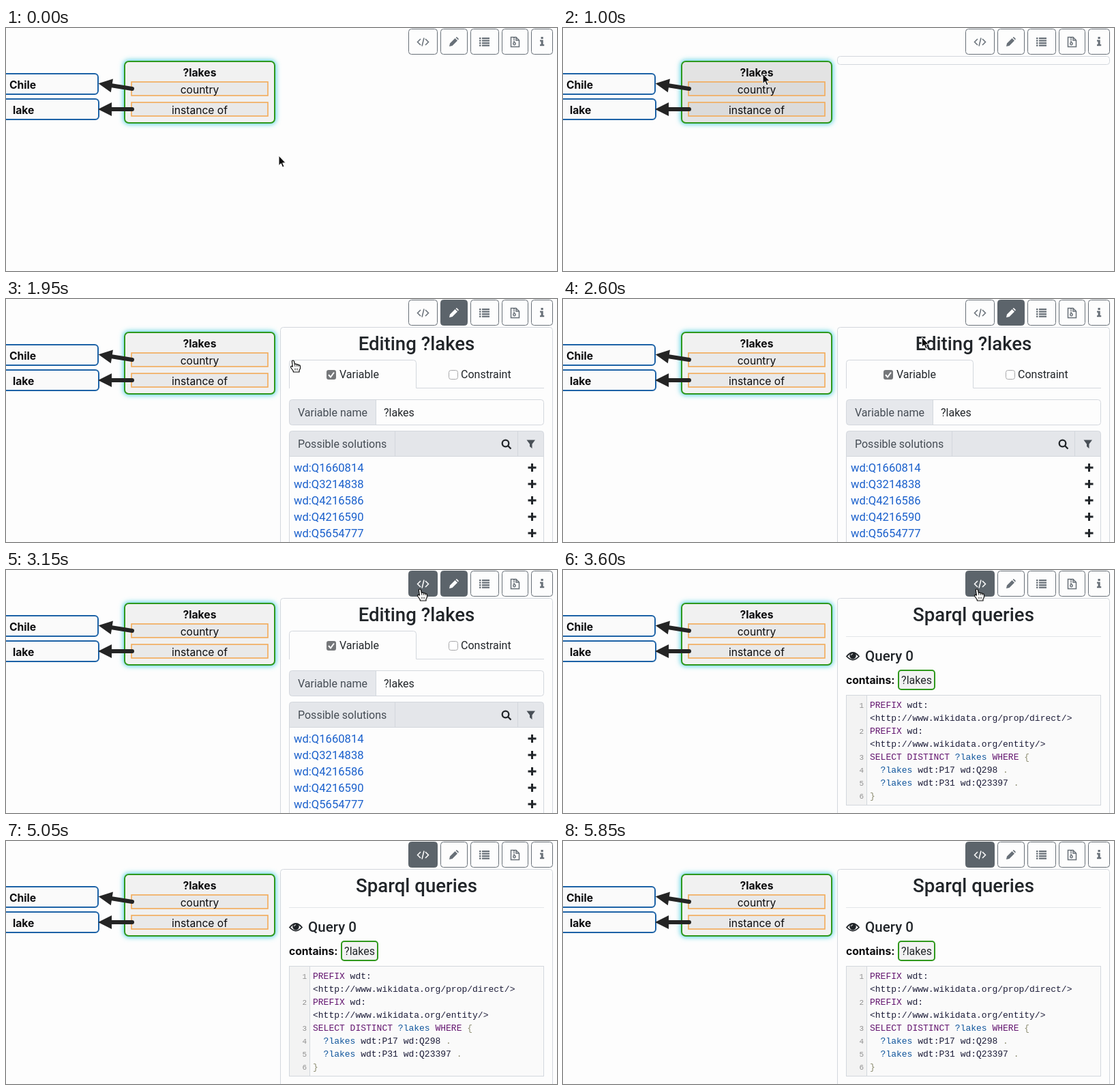
An HTML page that plays this animation: 808 by 356 pixels, repeating every 5.9 s.

```html
<!DOCTYPE html>
<html lang="en">
<head>
<meta charset="utf-8">
<title>Query builder</title>
<style>
html, body { margin: 0; width: 100%; height: 100%; overflow: hidden; background: #fdfdfd; }
body > svg { display: block; }
text { font: 16px Roboto, sans-serif; fill: #212529; white-space: pre; }
.node { font: 15.6px Inter, sans-serif; fill: #0c0c0e; }
.bold { font: bold 15.7px Inter, sans-serif; fill: #0c0c0e; }
.mid { text-anchor: middle; }
.title { font: 500 27.6px Roboto, sans-serif; }
.sub { font: 500 20.6px Roboto, sans-serif; }
.label { fill: #454c54; }
.link { font-size: 16.6px; fill: #1a60cc; }
.code text { font: 13px "Liberation Mono", monospace; fill: #1c1c38; }
.code .num { font-size: 11px; fill: #909090; text-anchor: end; }
.code .kw { fill: #63156f; } .code .var { fill: #0f559c; } .code .brace { fill: #8c8c70; }
.rule { fill: none; stroke: #d3d7dd; }
.line { fill: none; stroke: currentColor; }
.solid { fill: currentColor; }
.dark { fill: #212529; }
</style>
</head>
<body>
<svg width="808" height="356" viewBox="0 0 808 356">
  <defs>
    <filter id="glow" x="-10%" y="-20%" width="120%" height="140%"><feGaussianBlur stdDeviation="3.5"/></filter>
  </defs>

  <!-- graph -->
  <g stroke-width="2" fill="#fafafa" stroke="#1c62a6">
    <rect x="-20" y="67" width="155" height="30" rx="5"/>
    <rect x="-20" y="104" width="156" height="30" rx="5"/>
  </g>
  <text class="bold" x="5" y="89">Chile</text>
  <text class="bold" x="10" y="126">lake</text>
  <rect x="172" y="47" width="224" height="94" rx="8" fill="#4fd0e0" filter="url(#glow)"/>
  <rect id="box" x="174" y="49" width="220" height="90" rx="6" stroke="#2f981c" stroke-width="2"/>
  <g fill="#000" fill-opacity=".035" stroke="#f3ab58" stroke-width="1.6">
    <rect x="184" y="79" width="200" height="20"/>
    <rect x="184" y="109" width="200" height="20"/>
  </g>
  <text class="bold mid" x="284" y="71">?lakes</text>
  <text class="node mid" x="284" y="96">country</text>
  <text class="node mid" x="284" y="126">instance of</text>
  <g id="arrow" fill="#242424" stroke="#242424">
    <path d="M185 119H153" stroke-width="6" stroke-linecap="round"/>
    <path d="M135 119L155 109V129Z" stroke="none"/>
  </g>
  <use href="#arrow" transform="translate(185 89) rotate(9) translate(-185 -119)"/>

  <!-- toolbar -->
  <g id="bar" stroke-width="1.5">
    <g><rect x="590.5" y="1.5" width="42" height="37" rx="4"/>
      <path class="line" d="M608 16L603.5 20.5L608 25M615 16L619.5 20.5L615 25M613 14.5L610 26.5"/></g>
    <g><rect x="637.5" y="1.5" width="39" height="37" rx="4"/>
      <path class="solid" d="M650 27L651 22.5L658.5 15L662 18.5L654.5 26ZM659.5 14L661 13L664 16L663 17.5Z"/></g>
    <g><rect x="681.5" y="1.5" width="41" height="37" rx="4"/>
      <path class="line" stroke-width="2.2" d="M694 15.2h2.5m1.5 0h11M694 18.7h2.5m1.5 0h11M694 22.2h2.5m1.5 0h11M694 25.7h2.5m1.5 0h11"/></g>
    <g><rect x="727.5" y="1.5" width="38" height="37" rx="4"/>
      <path class="line" d="M740.5 13.5H748L752.5 18V27.5H740.5ZM748 13.5V18H752.5"/>
      <path class="line" stroke-width="2" stroke-dasharray="1.5 1" d="M745 14V21"/>
      <circle class="line" cx="745.5" cy="23" r="1.7"/></g>
    <g><rect x="770.5" y="1.5" width="31" height="37" rx="4"/>
      <path class="solid" d="M784.5 13h3.2v3h-3.2ZM783 17.5h4.7v6.5h1.5v2.2h-6.2v-2.2h1.5v-4.3h-1.5Z"/></g>
  </g>

  <!-- editing panel -->
  <svg id="edit" x="402" width="400">
    <rect class="frame rule" x=".5" y=".5" width="399" rx="4"/>
    <g transform="translate(-402 -41)">
      <text class="title mid" x="602" y="75">Editing ?lakes</text>
      <path class="rule" d="M415.5 131V93.5a4 4 0 0 1 4-4H597.5a4 4 0 0 1 4 4V130.5H789"/>
      <rect x="470" y="104" width="14" height="14" rx="3" fill="#75777a"/>
      <path d="M473 111L476 114.5L481 107.5" fill="none" stroke="#fff" stroke-width="2"/>
      <text x="489" y="116">Variable</text>
      <rect x="649.5" y="104.5" width="13" height="13" rx="3" fill="#fff" stroke="#a8a8aa"/>
      <text x="667" y="116">Constraint</text>

      <path d="M543 147.5H419.5a4 4 0 0 0-4 4V180.5a4 4 0 0 0 4 4H543Z" fill="#e6e8ec"/>
      <rect class="rule" x="415.5" y="147.5" width="373" height="37" rx="4"/>
      <path class="rule" d="M542.5 148V184"/>
      <text class="label" x="428" y="172">Variable name</text>
      <text x="554" y="172">?lakes</text>

      <path d="M415.5 230.5V197.5a4 4 0 0 1 4-4H784.5a4 4 0 0 1 4 4V230.5Z" fill="#e4e6ea"/>
      <path class="rule" d="M415.5 500V197.5a4 4 0 0 1 4-4H784.5a4 4 0 0 1 4 4V500M415.5 230.5H788.5M570.5 194V230M750.5 194V230"/>
      <text class="label" x="428" y="218">Possible solutions</text>
      <g fill="none" stroke="#212529" stroke-width="2.3">
        <circle cx="732.5" cy="211.5" r="4.8"/><path d="M736 215L740.5 219.5"/>
      </g>
      <path fill="#495057" d="M763.5 206.5H776L771.5 212.5V219L768 216V212.5Z"/>
      <g id="rows"></g>
    </g>
  </svg>

  <!-- query panel -->
  <svg id="query" x="402" y="41" width="400">
    <rect class="frame rule" x=".5" y=".5" width="399" rx="4"/>
    <g transform="translate(-402 -41)">
      <text class="title mid" x="602" y="75">Sparql queries</text>
      <path class="rule" stroke-opacity=".6" d="M415 97.5H789"/>
      <path d="M416 126.5Q425 115.5 434 126.5Q425 136.5 416 126.5Z" fill="none" stroke="#212529" stroke-width="1.8"/>
      <circle class="dark" cx="425" cy="125.5" r="4.8"/>
      <path d="M422.5 125Q422.5 122.8 425 122.8" fill="none" stroke="#fff"/>
      <text class="sub" x="443" y="133">Query 0</text>
      <text class="bold" x="415" y="167">contains:</text>
      <rect x="492" y="147" width="53" height="28" rx="4" fill="#f2f2f2" stroke="#2f981c" stroke-width="2"/>
      <text class="mid" x="518.5" y="167">?lakes</text>
      <rect x="415.5" y="183.5" width="373" height="161" fill="#fafafa" stroke="#d3d7dd"/>
      <rect x="416" y="184" width="29" height="160" fill="#f3f3f3"/>
      <path class="rule" d="M445.5 184V344"/>
      <g id="code" class="code"></g>
    </g>
  </svg>

  <g id="pointer" fill="#0c0c0c" stroke="#fff">
    <path d="M0 0V14.5L3.3 11.6L5.5 17L8 16L5.7 10.8H10.2Z"/>
  </g>
  <g id="hand" fill="#fff" stroke="#0c0c0c" stroke-width="1.2" stroke-linejoin="round">
    <path d="M-3.6 9L-4.6 1.8Q-4.600 0-3.100 0Q-1.900 0-1.500 1.500L-.6 5.500Q1.500 4.600 2.500 6Q4.400 5.300 5.200 6.800Q7.300 6.500 7.500 8.500V12L6 14.500V17H-2.500L-3 15L-6.300 10.500Q-6.800 8.600-5.300 8.300Q-4.500 8.200-3.600 9Z"/>
    <path d="M-.6 5.500L0 9M2.500 6L2.800 9M5.200 6.800V9M0 11.500V14.500M3 11.500V14.500" stroke-width=".9"/>
  </g>
</svg>
<script>
const LOOP = 5900, STEP = 50, FULL = 390, SHUT = 13;
const el = id => document.getElementById(id);
const set = (node, attrs) => { for (const k in attrs) node.setAttribute(k, attrs[k]); };
const clamp = u => Math.min(1, Math.max(0, u));
const lerp = (a, b, u) => a + (b - a) * u;
const smooth = u => u * u * (3 - 2 * u);
const ramp = (t, start, length) => smooth(clamp((t - start) / length) ** .75);
const mix = (a, b, u) => `rgb(${a.map((v, i) => Math.round(lerp(v, b[i], u)))})`;

const LIGHT = [253, 253, 253], GRAY = [104, 112, 120], ACTIVE = [92, 100, 107];
const OPEN_EDIT = 1000, HOVER_CODE = 2950, OPEN_QUERY = 3200;

// time, x, y of the mouse
const path = [
  [0, 400, 187], [200, 400, 187], [850, 293, 67], [1250, 293, 67], [1850, 424, 90],
  [2200, 424, 90], [2950, 610, 28], [3700, 610, 28], [4300, 530, 102], [4500, 530, 102],
  [5100, 560, 364], [LOOP, 560, 364]
];

el('rows').innerHTML = ['1660814', '3214838', '4216586', '4216590', '5654777'].map((q, i) => {
  const y = 247 + 24 * i;
  return `<text class="link" x="422" y="${y + 6}">wd:Q${q}</text>
    <path d="M765.5 ${y}h12M771.5 ${y - 6}v12" stroke="#212529" stroke-width="3"/>`;
}).join('');

const paint = line => line.replace(/</g, '&lt;')
  .replace(/PREFIX|SELECT DISTINCT|WHERE|\?lakes|[{}]|\.$/g, s => {
    const kind = s[0] === '?' ? 'var' : /\w/.test(s) ? 'kw' : 'brace';
    return `<tspan class="${kind}">${s}</tspan>`;
  });

let number = 0;
el('code').innerHTML = [
  'PREFIX wdt:', '<http://www.wikidata.org/prop/direct/>',
  'PREFIX wd:', '<http://www.wikidata.org/entity/>',
  'SELECT DISTINCT ?lakes WHERE {',
  '  ?lakes wdt:P17 wd:Q298 .', '  ?lakes wdt:P31 wd:Q23397 .', '}'
].map((line, i) => {
  const y = 202 + 19 * i;
  const num = line[0] === '<' ? '' : `<text class="num" x="441" y="${y}">${++number}</text>`;
  return `${num}<text x="450" y="${y}">${paint(line)}</text>`;
}).join('');

function mouseAt(t) {
  const i = path.findIndex(p => p[0] > t);
  const [a, b] = [path[i - 1], path[i]];
  const u = smooth((t - a[0]) / (b[0] - a[0]));
  return [lerp(a[1], b[1], u), lerp(a[2], b[2], u)];
}

function showPanel(id, y, height, visible) {
  const panel = el(id);
  panel.style.display = visible ? '' : 'none';
  set(panel, { y, height });
  set(panel.querySelector('.frame'), { height: height - 1 });
}

function draw(t) {
  const [x, y] = mouseAt(t);
  const within = (l, top, r, bottom) => x > l && x < r && y > top && y < bottom;
  const onTab = t > OPEN_EDIT && t < OPEN_QUERY && within(415, 89, 601, 131);
  const hand = onTab || within(590, 1, 633, 39);
  for (const id of ['pointer', 'hand']) {
    el(id).style.display = hand === (id === 'hand') ? '' : 'none';
    set(el(id), { transform: `translate(${x} ${y})` });
  }
  set(el('box'), { fill: within(174, 49, 394, 139) ? '#e3e3e3' : '#f1f1f1' });

  const opening = ramp(t, OPEN_EDIT, 350), swap = ramp(t, OPEN_QUERY, 350);
  const queryOn = t >= OPEN_QUERY;
  const queryHeight = lerp(SHUT, FULL, swap);
  showPanel('query', 41, queryHeight, queryOn);
  showPanel('edit', queryOn ? 41 + queryHeight : 41,
    lerp(SHUT, FULL, opening * (1 - swap)), t >= OPEN_EDIT && swap < 1);

  const shade = [ramp(t, HOVER_CODE, 150), ramp(t, OPEN_EDIT, 150) - ramp(t, OPEN_QUERY, 150)];
  [...el('bar').children].forEach((button, i) => {
    const u = shade[i] || 0;
    button.style.color = mix(GRAY, LIGHT, u);
    set(button.firstElementChild, {
      fill: mix(LIGHT, ACTIVE, u), stroke: mix(GRAY, ACTIVE, u), 'stroke-width': 1
    });
  });
}

function tick() {
  draw(Math.floor(performance.now() % LOOP / STEP) * STEP);
  requestAnimationFrame(tick);
}
tick();
</script>
</body>
</html>
```
